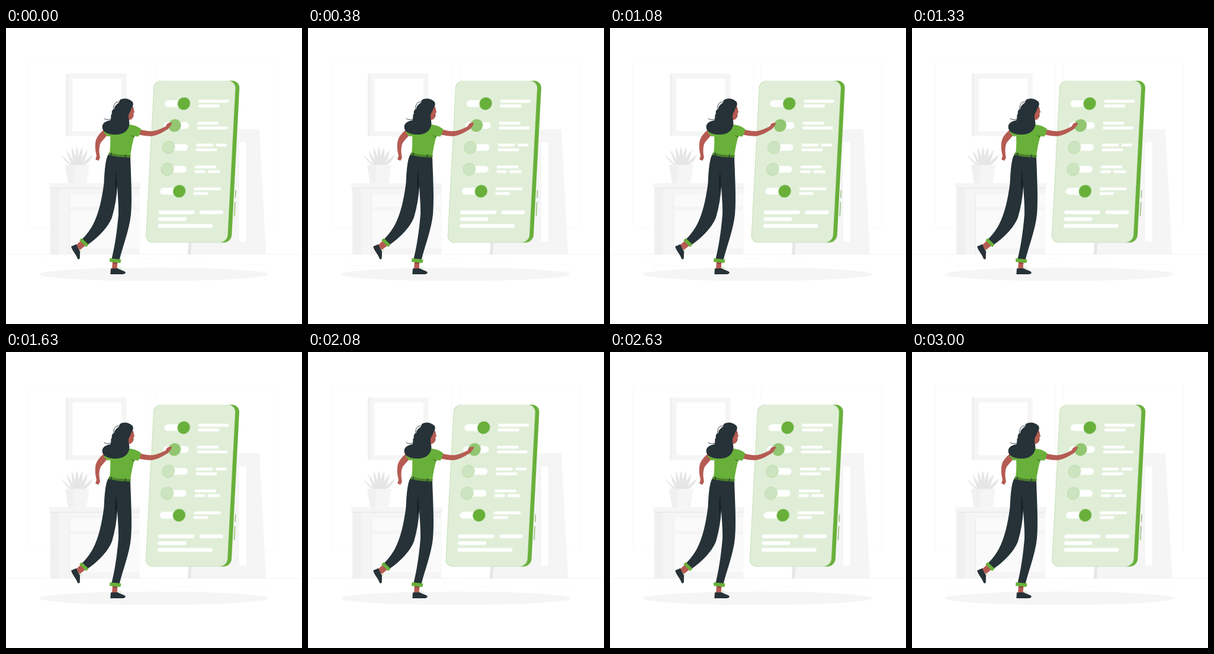
An HTML page for the animation above (3040 ms loop, 500 by 500 pixels).

```html
<!DOCTYPE html>
<html lang="en">
<head>
<meta charset="utf-8">
<title>Settings panel</title>
<style>
  html, body { margin: 0; width: 100%; height: 100%; overflow: hidden; background: #fff; }
  svg { display: block; width: 100%; height: 100%; }
  .g0 { fill: #fafafa; }
  .g1 { fill: #f5f5f5; }
  .g2 { fill: #f0f0f0; }
  .g3 { fill: #e6e6e6; }
  .white { fill: #fff; }
  .green { fill: #68b03a; }
  .belt { fill: #4a8129; }
  .skin { fill: #b55b52; }
  .dark { fill: #263238; }
  .line { fill: none; stroke: #ebebeb; stroke-width: .5; }
  .strand { fill: none; stroke: #263238; stroke-width: .9; stroke-linecap: round; }
</style>
</head>
<body>
<svg viewBox="0 0 500 500">
  <!-- room -->
  <g class="line">
    <rect x="39" y="55.3" width="203.5" height="282" rx="2" opacity=".6"/>
    <rect x="255" y="55.3" width="203.5" height="282" rx="2" opacity=".6"/>
    <path d="M0 382.4H500"/>
    <path d="M57 392.3H70M226 389.8H256M288 395.3H336M393 399.6H447M71 401.6H131" opacity=".6"/>
  </g>
  <path class="g1" d="M101 77H203.5V182.5H101Z"/>
  <path class="g2" d="M101 77H105V182.5H101Z"/>
  <path class="white" d="M112.3 85.3H195V174.3H112.3Z"/>

  <path class="g1" d="M75 270H225.5V382.4H75Z"/>
  <path class="g2" d="M75 270H90V382.4H75Z"/>
  <path class="g0" d="M107.5 281H225V302H107.5ZM107.5 308H225V372H107.5Z"/>
  <path class="g3" d="M107 281H107.8V382H107Z"/>
  <rect class="g1" x="73" y="262.3" width="154" height="8" rx="1.5"/>
  <path class="g3" d="M75 270H225.5V271.2H75Z"/>

  <g id="leaves" class="g3"></g>
  <path class="g1" d="M100 231.3H141L136 262.3H105Z"/>
  <path class="g2" d="M100 231.3H115.5L114 262.3H105Z"/>

  <path class="g1" d="M322 170.7H428L439.3 382.4H307Z"/>
  <path class="g3" d="M322 170.7H326L312 382.4H307Z"/>
  <path class="white" d="M394 193H406V361H394Z"/>

  <ellipse class="g1" cx="249.5" cy="416" rx="193.5" ry="11.3"/>

  <g id="panel">
    <g transform="translate(250 89) skewX(-3)">
      <rect class="green" width="145" height="273.4" rx="13"/>
      <rect x=".2" y=".1" width="138" height="273.2" rx="13" fill="#e0eed8"/>
      <path d="M147.8 185V198M147.8 205V229" stroke="#5f9f36"/>
      <g id="rows"></g>
    </g>
  </g>

  <!-- woman -->
  <path class="skin" d="M165 172C157 179 151.500 186 151 195C150 204 152 211 153 216L151 222L156 224.300L158.800 219.500L158 214C157 206 157.500 198 160.500 193L171 181Z"/>
  <path class="skin" d="M225 171C232 173 239 174.500 246 174.300C254 173.500 263 170 270 166C271 163 273 160.500 276 160.300L280 160C280.500 162 279 164 277.500 166L274 170.500C265 176 256 181.500 246 182.800C239 183 231 181.500 223 180Z"/>
  <path class="skin" d="M128 358L135 367L124.500 375L118 367Z"/>
  <path class="skin" d="M180 394H188.500L187.500 408H179Z"/>
  <path d="M180 395.500H188.500L188 398Q184 399 180 397Z" fill="#8f433c"/>
  <path class="dark" d="M110 369L119 365.300C120.500 371 124 374 125 378L124.700 389.500Q123 391.500 121 390C118.500 382 112 377 110 369Z"/>
  <path class="dark" d="M177 406.300L189 406C193 409.300 200.500 409.800 201.800 412.800C201.500 415.500 199 416 196 416H176.300Z"/>
  <path d="M124 374.500L128 375.500L125 378M188 404.500L193 404L194 407.500L191 407" fill="none" stroke="#b4d79c" stroke-width=".7"/>

  <path class="dark" d="M172.500 214C168 222 166.500 240 165.500 262C162 290 156 315 147 332C141 343 135 350 128.500 357L138 366C153 356 172 338 179 320C184 303 187 285 188 268C189 285 190.500 302 190 315C187.500 345 183.500 370 178.500 390L191.500 392C197.500 368 208.500 340 211 315C213.500 290 211 250 210 217Z"/>
  <path d="M186 241C183.200 258 184 267 185 278L187.700 264Z" fill="#172025"/>
  <path class="green" d="M124 358.500L128 355L139.500 366L135.500 370Z"/>
  <path class="green" d="M175.500 389L194.500 391L193.300 397L175 395Z"/>

  <path class="green" d="M164.500 176L178 168L206 163C215 163.500 223 166 228.300 171C227.500 176 226 180 223.300 183.500L216.800 182.500C214 193 211.500 204 210 216.500L175 211.500C176.500 200 176.500 190 176 182L172 183.500Z"/>
  <path class="belt" d="M209 180C212 181.500 215 182.500 217.500 182.500L216.500 185Q212 183 209 180Z"/>
  <path class="belt" d="M174 210.500Q190 214.500 211 215L210 219Q189 218.500 172.500 214.500Z"/>
  <path d="M178.500 210.500L177.500 216M202 213.500L201 219.500" stroke="#263238" stroke-width="1.3"/>

  <path class="skin" d="M206 138L212 132C215 132 215.500 135 215.700 138L217.300 142L215.500 143.500C216 149 214.500 155 207 155.500Z"/>
  <path d="M213 137L215.300 136M213.500 149L215.500 148.500" stroke="#263238" stroke-width=".8"/>
  <path class="dark" d="M192 122C197 117 209 119 213.500 124.500C216 128 214.500 133 211.500 136C211 141 207.500 143 207 148C206.500 153 209.500 158 208 165C206 172.500 200 178.500 190 179.800C178 181 165 178 163 170C161 162 167 157.500 176 156C179 153 175.500 148 179 144.500C177.500 140 181 137 183 137C183 131.500 187.500 128.500 191 126Z"/>
  <path class="strand" d="M192 125C184 123.500 180.500 130 182 140M180 151C177 155.500 171 155.500 166 153.300"/>
</svg>
<script>
const LOOP = 3040, TICKS = 73, SHAKE = 3000;
const byId = id => document.getElementById(id);

// Panel rows, in the panel's upright coordinates
const TRACK = 20, TEXT = 76.7, KNOB = 10.5, TRAVEL = 22, PITCH = 37;
const rows = [
  { on: 1, text: [[52], [36.5]] },
  { on: .38, text: [[36.5], [52]] },
  { on: 0, text: [[29, 19], [36.5]] },
  { on: 0, text: [[36.5], [18, 21]] },
  { on: 1, text: [[46], [25]] }
];
const footer = [[61, 40], [48], [93]];

const pill = (x, y, w, h) =>
  `<rect x="${x}" y="${y - h / 2}" width="${w}" height="${h}" rx="${h / 2}" fill="#fff"/>`;

function words(widths, x, y, h, gap) {
  return widths.map(w => {
    const bar = pill(x, y, w, h);
    x += w + gap;
    return bar;
  }).join("");
}

function toggle(on, y) {
  const knob = `cx="${TRACK + KNOB + TRAVEL * on}" cy="${y}" r="${KNOB}"`;
  const tint = .15 + .85 * on ** .55;
  return pill(TRACK, y, TRAVEL + 2 * KNOB, 11.4) +
    `<circle ${knob} fill="#e0eed8"/>` +
    `<circle ${knob} fill="#68b03a" fill-opacity="${tint}" stroke="#68b03a" stroke-width=".25"/>`;
}

byId("rows").innerHTML = rows.map(({ on, text }, i) => {
  const y = 38.7 + PITCH * i;
  return toggle(on, y) +
    text.map((line, j) => words(line, TEXT, y - 4 + 8 * j, 4.8, 4)).join("");
}).join("") +
  footer.map((line, i) => words(line, 19.2, 222.3 + 11.45 * i, 6.3, 8.5)).join("");

// Leaves fan out from the pot, lower towards the sides
const leaf = k => {
  const base = 120 + 3 * k, tip = 120 + 9 * k, top = 200 + 1.5 * k * k;
  const bend = 120 + 6 * k;
  return `<path d="M${base - 2.5} 232Q${bend - 4} ${top + 10} ${tip} ${top}Q${bend + 4} ${top + 14} ${base + 2.5} 232Z"/>`;
};
byId("leaves").innerHTML = [-3, -2, -1, 0, 1, 2, 3].map(leaf).join("");

// Sideways shake: the second half mirrors the first
const half = [0, -1, 2, -4, 4];
const offsets = [...half, -4, ...half.reverse()];
const shake = byId("panel").animate(
  offsets.map(x => ({ transform: `translate(${x}px, 0px)`, easing: "ease" })),
  { duration: SHAKE, fill: "both" }
);
shake.pause();

const start = performance.now();
function draw() {
  const time = Math.max(0, performance.now() - start) % LOOP;
  const tick = Math.floor((time + 5) / LOOP * TICKS) % TICKS;
  // each tick shows the pose half a tick earlier
  shake.currentTime = (tick + TICKS - .5) % TICKS / TICKS * SHAKE;
  requestAnimationFrame(draw);
}
draw();
</script>
</body>
</html>
```
